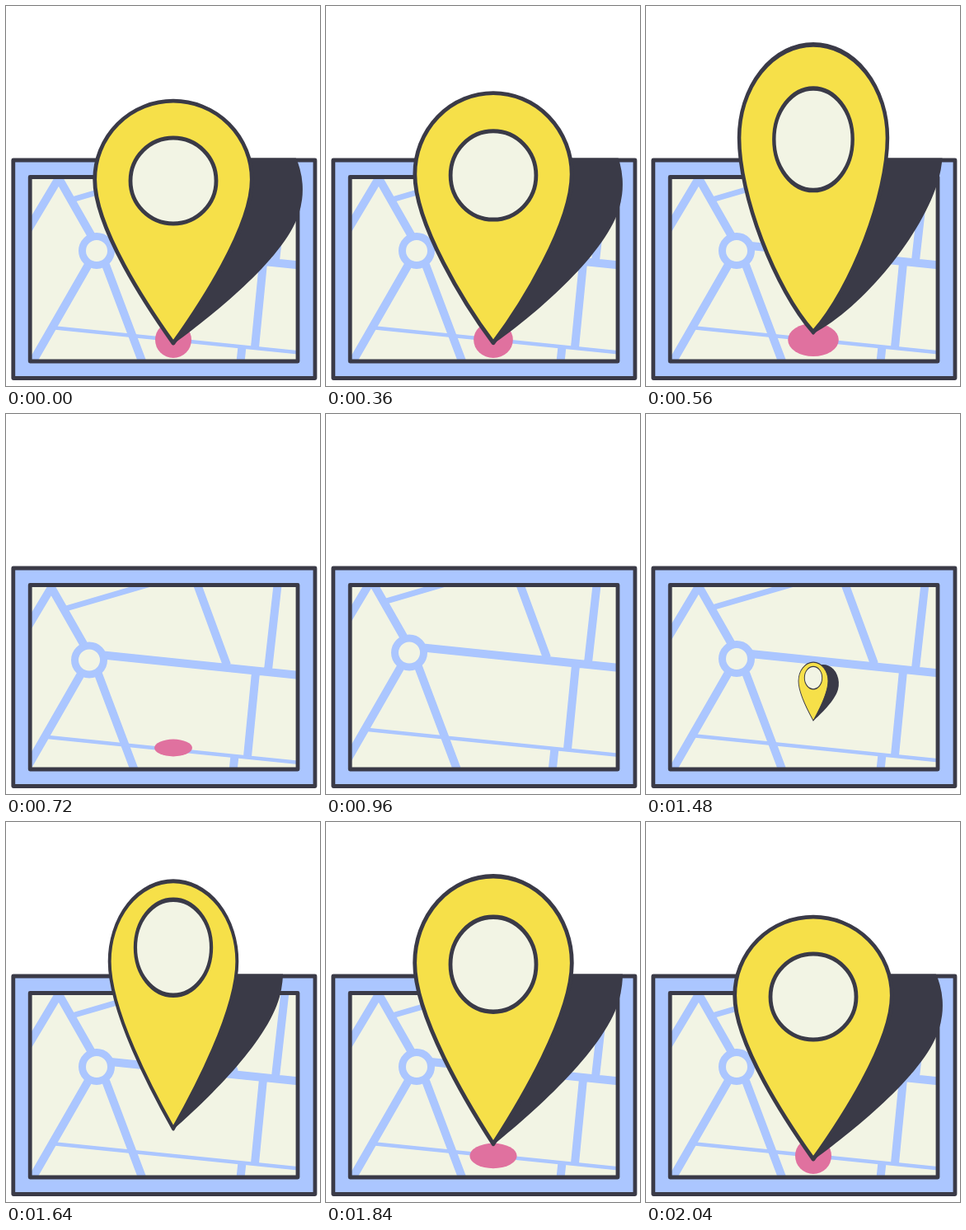
An HTML page with a canvas for the animation above (2.88 s loop, 381 by 461 pixels).

```html
<!DOCTYPE html>
<html lang="en">
<head>
<meta charset="utf-8">
<title>Map pin</title>
<style>
html, body { margin: 0; width: 100%; height: 100%; overflow: hidden; background: #fff; }
canvas { display: block; }
</style>
</head>
<body>
<canvas id="stage" width="381" height="461"></canvas>
<script>
const c = document.getElementById('stage').getContext('2d');
const DARK = '#3a3a47', BLUE = '#abc6ff', CREAM = '#f2f4e4', YELLOW = '#f6e049', PINK = '#e0719f';
const LOOP = 2880, STEP = 40, CX = 203, LINE = 4.8;

const ramp = (t, from, to) => Math.min(1, Math.max(0, (t - from) / (to - from)));
const ease = (t, from, to) => {
  const u = ramp(t, from, to);
  return u * u * (3 - 2 * u);
};

function box(x, y, right, bottom) {
  const p = new Path2D();
  p.rect(x, y, right - x, bottom - y);
  return p;
}

function disc(x, y, rx, ry) {
  const p = new Path2D();
  p.ellipse(x, y, rx, ry, 0, 0, 2 * Math.PI);
  return p;
}

const outer = box(8.8, 187, 375, 451.5), inner = box(29.2, 207.5, 354, 431);
const outerEdge = box(6.4, 184.6, 377.4, 453.9);
const hole = disc(0, -197, 52, 52);
const roundabout = disc(110, 297, 17.5, 17.5);
const streets = new Path2D(`M14 292.5L64 209L105 281 M101 312L16 460 M121 314L176 460
  M127 291L400 319 M238 197L277 303 M342 175L327 309 M312 312L302 414 M286.5 413L281.5 460`);
const lane = new Path2D('M80 235L200 200');
const path = new Path2D('M55 390L400 425');

// Pin with its tip at the origin; bulge fattens the lower sides.
function pinShape(bulge) {
  const w = 32 + bulge;
  return new Path2D(`M0 0C${-w}-45-95.3-140-95.3-198.5
    A95.3 95.3 0 0 1 95.3-198.5C95.3-140 ${w}-45 0 0Z`);
}

function fill(shape, color) {
  c.fillStyle = color;
  c.fill(shape);
}

function stroke(shape, color, width = LINE) {
  c.strokeStyle = color;
  c.lineWidth = width;
  c.stroke(shape);
}

function drawMap(t) {
  // Drift left, sweep up and right, then come home.
  const out = ease(t, 600, 840), up = ease(t, 840, 1160), home = ease(t, 1160, 1440);
  fill(outer, BLUE);
  stroke(outer, DARK);
  fill(inner, CREAM);
  c.save();
  c.clip(inner);
  c.translate(-18 * out + 28.5 * up - 10.5 * home, 3 * out - 33 * up + 30 * home);
  stroke(streets, BLUE, 10);
  stroke(lane, BLUE, 7);
  stroke(path, BLUE, 4.5);
  stroke(roundabout, BLUE, 9);
  c.restore();
}

function drawDot(t) {
  const gone = t < 1000 ? ramp(t, 320, 800) : 1 - ramp(t, 1760, 2040);
  const size = 1 - gone ** 3.5;
  fill(disc(CX, 405, 22 * size ** .75 * (1 + gone), 22 * size), PINK);
}

function drawPin(t) {
  const leaving = t < 1000;
  const pull = leaving ? ramp(t, 320, 640) : 0;
  const grow = leaving ? 1 - ease(t, 640, 720) : ease(t, 1380, 1740);
  if (!grow) return;

  const lift = leaving ? ramp(t, 320, 720) ** 2 : 1 - ease(t, 1680, 2000);
  const stretch = leaving ? 1 + .25 * pull : 1.28 - .28 * ease(t, 1560, 2040);
  const narrow = 1 - .1 * pull * pull;
  const swell = 1 + .6 * grow * (1 - grow);
  const tall = grow * stretch;
  const body = pinShape(24 * pull);

  const part = (sx, sy, draw) => {
    c.save();
    c.translate(CX, 409 - 37 * lift);
    c.scale(sx, sy);
    draw();
    c.restore();
  };

  c.save();
  c.clip(outerEdge);
  part(grow * Math.sqrt(swell), tall, () => {
    c.translate(-1, 2);
    c.rotate(.321);
    fill(body, DARK);
  });
  c.restore();
  part(grow * narrow, tall, () => {
    fill(body, YELLOW);
    stroke(body, DARK);
  });
  part(grow * swell * narrow ** 1.5, tall * swell, () => {
    fill(hole, CREAM);
    stroke(hole, DARK);
  });
}

function frame() {
  const t = Math.floor(performance.now() % LOOP / STEP) * STEP;
  c.clearRect(0, 0, 381, 461);
  c.lineJoin = 'round';
  drawMap(t);
  drawDot(t);
  stroke(inner, DARK);
  drawPin(t);
  requestAnimationFrame(frame);
}
frame();
</script>
</body>
</html>
```
